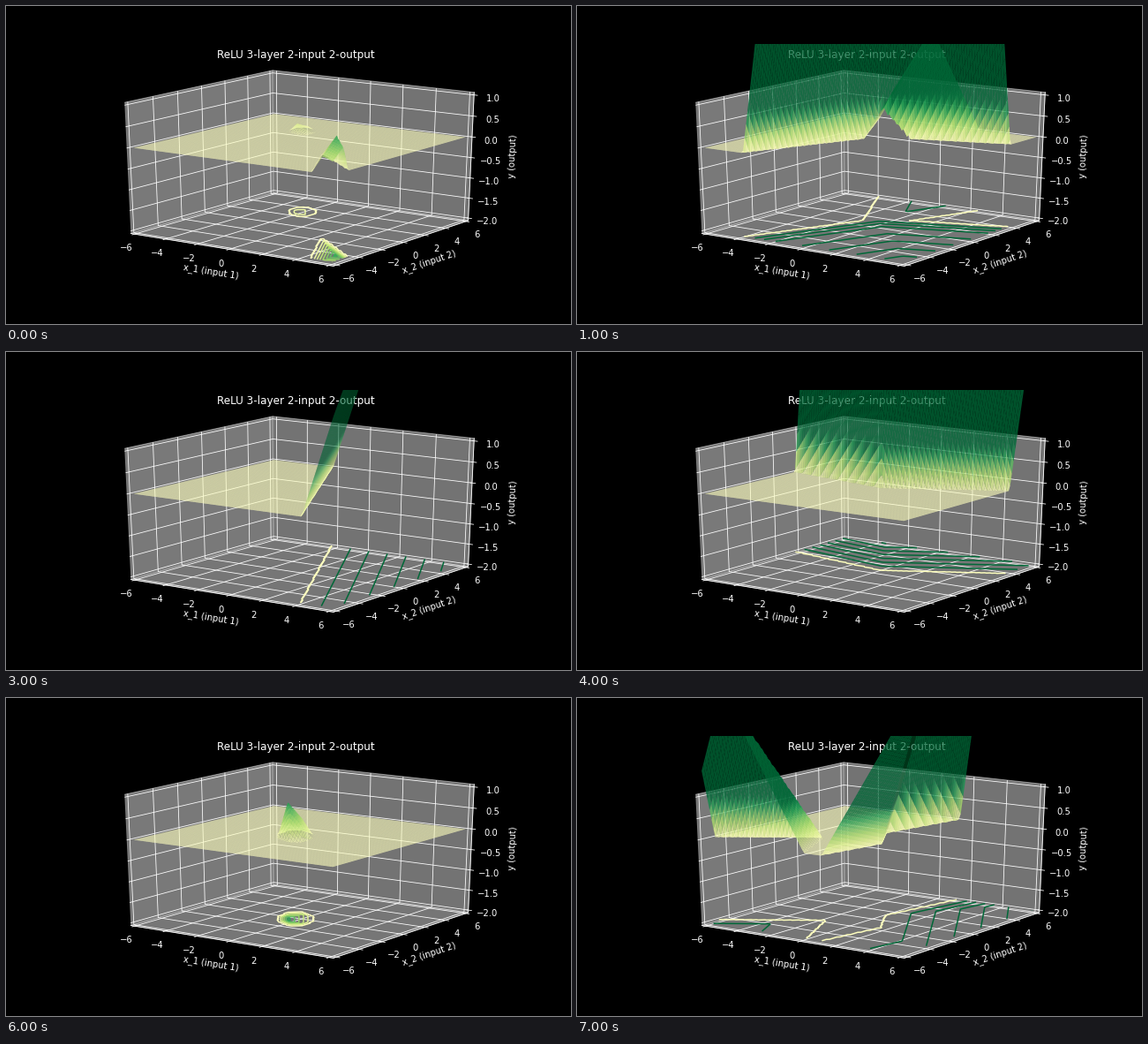
Animation, 640 px wide and 360 px high, one loop 8000 ms. Source, as a matplotlib script:

```python
import numpy as np
import matplotlib.pyplot as plt
from matplotlib.animation import FuncAnimation

plt.style.use("dark_background")

DPI = 72
AZIM, ELEV = -55, 20
STYLE = dict(cmap="RdYlGn", vmin=-1, vmax=1)

grid = np.linspace(-6, 6, 100)
x, y = np.meshgrid(grid, grid)

# Horizontal screen axes: s runs to the right, t towards the viewer
a = np.radians(-AZIM)
s = x * np.sin(a) + y * np.cos(a)
t = x * np.cos(a) - y * np.sin(a)


def low(*planes):
    return np.minimum.reduce(planes)


def high(*planes):
    return np.maximum.reduce(planes)


def plane(x0, y0, gx, gy, scale=1):
    """Linear ramp that is zero at (x0, y0)."""
    return scale * (gx * (x - x0) + gy * (y - y0))


def tent(s0, t0, ws, wt, height):
    """Lopsided bump with cut corners."""
    ds, dt = (s - s0) / ws, (t - t0) / wt
    return height * low(1.9 * (1 + ds), 0.75 * (1 - ds), 1.5 * (1 - dt),
                        1.15 * (1 + dt), 1.5 * (1.35 - abs(ds) - abs(dt)))


def corner_peak():
    peak = low(plane(4.8, -6, 0.88, 0.47, 0.7),
               plane(6, -4.7, -0.625, -0.78, 1.7),
               0.76 + plane(5.4, -4.8, -0.15, 0.31))
    return high(peak, tent(0.06, -3.1, 0.65, 1.1, 0.17))


def front_dome():
    slope = low(plane(-3.6, -6, 0.923, -0.384), plane(1, 1.8, 0.322, -0.947))
    dome = 2.8 * low(slope, 1 + 0.35 * slope)
    ridge = 0.8 * low(plane(-0.89, 0.5, 0.887, 0.46),
                      plane(1, 1.8, -0.936, 0.351))
    return high(dome, ridge)


def twin_hills():
    left = low(plane(-6, -5.17, 0.58, -0.816, 1.1),
               plane(-1, -6, -0.995, -0.097, 0.88))
    back = high(plane(1, -3, 0.563, -0.826),
                plane(3.2, -1.5, 0.846, -0.538, 1.9))
    right = low(plane(1.4, -6, 1.2, 0.12), back,
                1.8 + plane(2.9, -6, 0.2, 0.08))
    return high(left, right)


def side_ramp():
    return plane(4.2, -6, 0.85, 0.45, 1.5)


def back_wall():
    return low(plane(-6, 1.5, 0.183, 0.983, 3.6),
               plane(0.35, 0.32, -0.479, 0.878, 2.6))


def left_bump():
    return tent(-3.4, -1.56, 1.83, 2.5, 1.45)


def middle_bump():
    return tent(-0.3, 0.57, 0.86, 1.6, 0.75)


def valley():
    left = low(plane(-6, -5.17, 0.547, -0.837, 2.3),
               plane(0.15, -6, -0.92, -0.39, 0.8))
    front = plane(1.2, -6, 0.7, -0.12)
    back = low(plane(0.4, 0.4, 1, -0.17, 3.5),
               plane(1.9, -1.9, 0.866, 0.504, 1.6))
    return high(left, front, back)


shapes = [corner_peak, front_dome, twin_hills, side_ramp,
          back_wall, left_bump, middle_bump, valley]
heights = [np.maximum(0, shape()) for shape in shapes]

fig = plt.figure(figsize=(640 / DPI, 360 / DPI), dpi=DPI)
ax = fig.add_subplot(projection="3d", facecolor="none")
ax.apply_aspect = lambda position=None: None  # fill the wide subplot
ax.set_box_aspect((1, 1, 1), zoom=0.94674)
ax.view_init(ELEV, AZIM)
ax.set(xlabel="x_1 (input 1)", ylabel="x_2 (input 2)", zlabel="y (output)",
       xlim=(-6.25, 6.25), ylim=(-6.25, 6.25), zlim=(-2.0625, 1.0625),
       xticks=range(-6, 7, 2), yticks=range(-6, 7, 2),
       zticks=np.arange(-2, 1.1, 0.5))

# Behind the axes, so the surface covers it
fig.text(0.5125, 0.835, "ReLU 3-layer 2-input 2-output", size=12,
         ha="center", zorder=-1)

parts = []


def update(i):
    while parts:
        parts.pop().remove()
    z = heights[i]
    parts.append(ax.plot_surface(x, y, z, rstride=1, cstride=1, linewidth=0,
                                 alpha=0.8, **STYLE))
    parts.append(ax.contour(x, y, z, zdir="z", offset=-2, **STYLE))
    return parts


anim = FuncAnimation(fig, update, frames=len(heights), interval=1000,
                     repeat=True)
plt.show()
```
